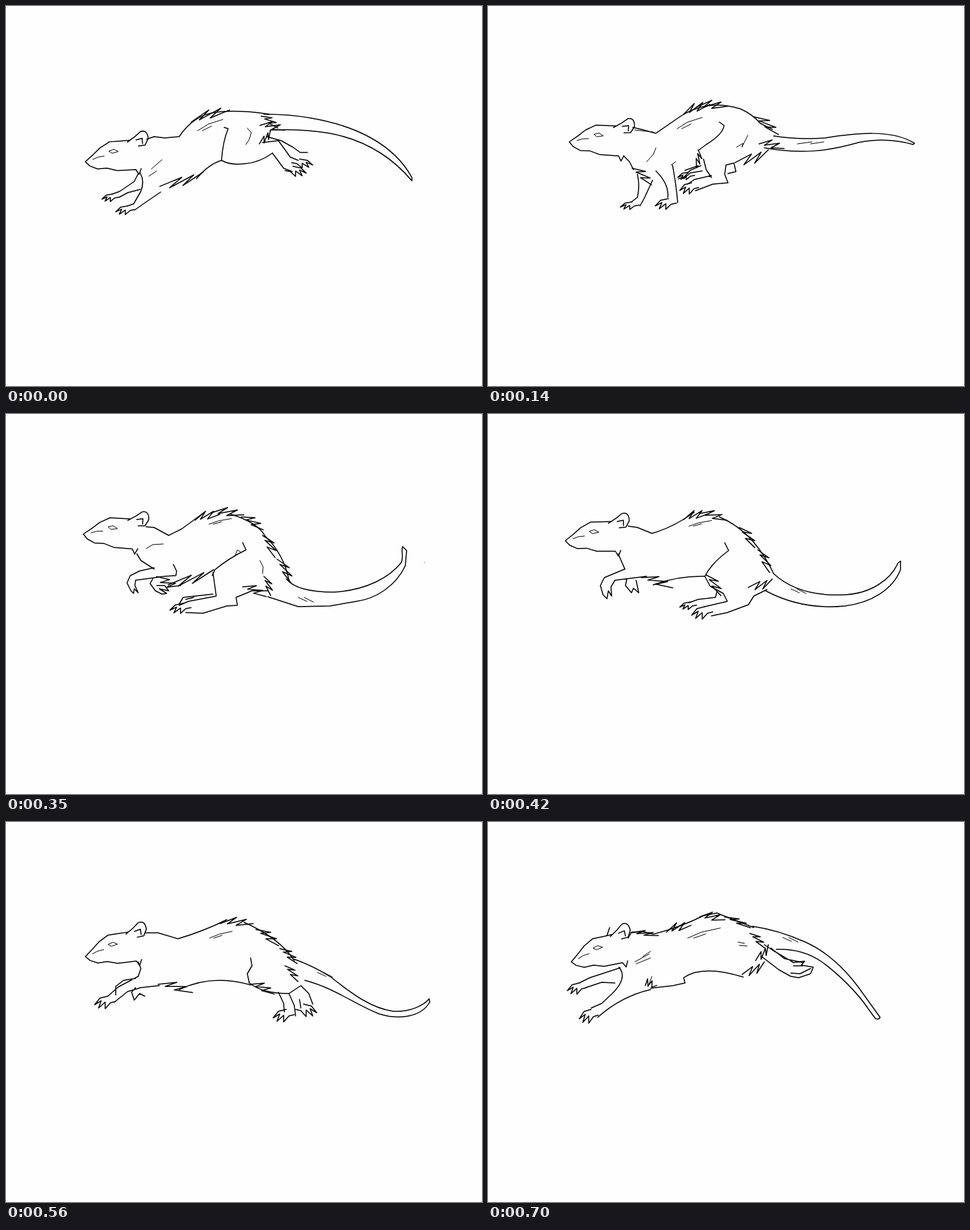
These frames come from a looping animation (720x576 px, 0.77 s). An HTML page without scripts:

```html
<!DOCTYPE html>
<html lang="en">
<head>
<meta charset="utf-8">
<title>Running rat</title>
<style>
html, body { margin: 0; width: 100%; height: 100%; overflow: hidden; background: #fefefe; }
.stage { width: 720px; height: 576px; overflow: hidden; }
/* Eleven poses stacked in a strip; the 1 ms lead avoids late steps. */
.strip { animation: run 770ms steps(11) -1ms infinite; }
@keyframes run { to { transform: translateY(-1100%); } }
.strip { height: 576px; }
svg { display: block; width: 720px; height: 576px; }
svg.parts { position: absolute; width: 0; height: 0; }
path { fill: none; stroke: #000; stroke-width: 1.5; stroke-linecap: round; stroke-linejoin: round; vector-effect: non-scaling-stroke; }
.fine { stroke-width: 1; }
</style>
</head>
<body>
<svg class="parts"><defs>
  <g id="head">
    <path d="M65-36L51-34 35-32 21-22 11-11 0 0 7 6 19 10 33 8 49 11 77 8l5 7 3-9"/>
    <path d="M62-33l11-9 8-8q10-4 12 10l-4 10-10 2M75-37l9-3 1 8"/>
    <path class="fine" d="M35-18l7-3 7 3-9 3zM11-4l8-4 9-2"/>
  </g>
  <path id="tuft" d="M0 0l20-6-12 8 23-3-13 7 20 1"/>
  <path id="paw" d="M0 0l-12 3-8 10 10-6-4 11 10-9 0 10 8-9 8-2"/>
  <path id="hatch" class="fine" d="M0 0l16-10 22-7M7 0l14-7"/>
  <path id="ticks" class="fine" d="M0 0l13 6M9 0l14 7"/>
</defs></svg>

<div class="stage"><div class="strip">

<!-- stretched, falling -->
<svg>
<use href="#head" transform="translate(120 236) rotate(3)"/>
<path d="M213 202L224 198 240 200 262 198Q284 165 318 161 352 157 398 164M403 223Q384 237 362 239 340 242 326 234 328 205 336 186L330 184M326 234Q306 240 288 262"/>
<path d="M388 207L412 204 430 229 442 234M403 223L420 246 433 251M394 198L416 204 434 214 445 222 456 222"/>
<path d="M234 282L212 297 195 309M203 253Q210 266 204 281L193 300 184 303M200 254L194 266 172 281 161 285M203 278L184 283 171 290"/>
<path d="M390 164Q430 164 462 170C525 181 585 207 614 260V265C588 234 548 204 490 193Q445 186 400 188"/>
<use href="#paw" transform="translate(184 303) scale(.9 .7)"/>
<use href="#paw" transform="translate(161 285) scale(.8 .6)"/>
<use href="#paw" transform="translate(444 232) scale(-1 .7)"/>
<use href="#paw" transform="translate(434 243) scale(-1 .8)"/>
<use href="#tuft" transform="translate(280 176) rotate(-24) scale(1.6 1)"/>
<use href="#tuft" transform="translate(386 167) rotate(25) scale(.8)"/>
<use href="#tuft" transform="translate(384 181)"/>
<use href="#tuft" transform="translate(400 188) rotate(118) scale(.7)"/>
<use href="#tuft" transform="translate(298 252) rotate(156) scale(1.8 1)"/>
<use href="#hatch" x="290" y="189"/>
<path class="fine" d="M216 258L228 250M220 247L236 233M365 185l6 7-3 10-5 8"/>
</svg>

<!-- front paws reaching ground -->
<svg>
<use href="#head" transform="translate(121 221) rotate(6)"/>
<path d="M217 193L234 193 256 196Q286 164 318 156 364 148 412 177M322 234Q322 212 338 200L344 187 338 180M322 234Q300 248 254 268M204 237L216 258"/>
<path d="M396 212L402 222 394 238 401 252 370 268 354 273M372 232L378 246 360 262 346 265M366 234L358 248 330 263"/>
<path d="M254 267Q246 292 232 310M232 268L230 284 222 302M216 258Q218 280 194 300M229 276Q218 298 205 307"/>
<path d="M412 177C478 178 570 190 638 234V238C570 207 490 207 408 202"/>
<use href="#paw" transform="translate(221 302)"/>
<use href="#paw" transform="translate(194 299) scale(.9)"/>
<use href="#paw" transform="translate(346 265)"/>
<use href="#tuft" transform="translate(288 172) rotate(-22) scale(1.6 1)"/>
<use href="#tuft" transform="translate(394 164) rotate(26)"/>
<use href="#tuft" transform="translate(404 188) scale(.8)"/>
<use href="#tuft" transform="translate(412 202) rotate(140) scale(.9)"/>
<use href="#tuft" transform="translate(256 266) rotate(170)"/>
<use href="#hatch" x="288" y="188"/>
</svg>

<!-- front paws planted -->
<svg>
<use href="#head" transform="translate(123 206) rotate(10)"/>
<path d="M219 184L232 187 254 193 290 168Q332 140 382 156 400 164 412 178L430 187M350 176L357 181Q356 194 330 210L318 219M206 228L214 236 220 248M288 262L297 259 306 249 322 242"/>
<path d="M326 232L330 248 338 260M372 238L360 241 358 255 363 268 340 270 314 280M372 238L375 251 363 254M338 257L312 263 302 270M324 250L306 253 296 262M318 242L298 249"/>
<path d="M254 250Q274 270 272 290M279 241Q284 266 287 298M226 255Q230 272 226 290L217 297M249 264L237 290 230 303"/>
<path d="M432 197Q470 203 510 200C555 193 610 186 645 208L643 210C615 202 590 201 560 207 515 220 475 225 418 215"/>
<use href="#paw" transform="translate(273 292) scale(1 .85)"/>
<use href="#paw" transform="translate(218 297) scale(.9 .6)"/>
<use href="#paw" transform="translate(308 268) scale(.9)"/>
<use href="#paw" transform="translate(303 252) scale(.8 .6)"/>
<use href="#tuft" transform="translate(296 164) rotate(-30) scale(1.1 1)"/>
<use href="#tuft" transform="translate(316 153) rotate(-10) scale(1.2 1)"/>
<use href="#tuft" transform="translate(402 168) rotate(27) scale(1.2 1)"/>
<use href="#tuft" transform="translate(410 209)"/>
<use href="#tuft" transform="translate(424 218) rotate(150) scale(1.4 1.2)"/>
<use href="#tuft" transform="translate(318 218) rotate(85) scale(.7)"/>
<use href="#tuft" transform="translate(218 246) rotate(30)"/>
<use href="#hatch" x="286" y="186"/>
<path class="fine" d="M222 188L250 191M277 241l7-5M240 236l10-11 4-10M376 214l10-6-2 6 9-18M468 209l22-3M488 209l20-3"/>
</svg>

<!-- gathered -->
<svg>
<use href="#head" transform="translate(121 180) rotate(20)"/>
<path d="M222 176L238 182 252 186Q280 184 300 152M352 156Q390 170 420 212M362 192L365 199 361 210M345 207Q314 208 298 233M196 214L206 228 230 248M215 210L208 232"/>
<path d="M332 262L326 275 290 288 274 290M306 236L298 264 284 270 262 275"/>
<path d="M258 234L228 249 226 262 232 276 246 278 238 268 244 256 262 250 290 245M252 254L256 270M266 261L270 272M270 260H306M268 289L276 301H282L276 289"/>
<path d="M436 237Q470 243 500 239C545 229 580 212 610 206L630 206V208L606 211C574 224 542 246 510 256 480 266 440 264 410 253"/>
<use href="#paw" transform="translate(262 275)"/>
<use href="#tuft" transform="translate(286 164) rotate(-28) scale(.9)"/>
<use href="#tuft" transform="translate(304 156) rotate(-8) scale(1.7 1)"/>
<use href="#tuft" transform="translate(222 176) rotate(12) scale(.8)"/>
<use href="#tuft" transform="translate(414 206) rotate(44)"/>
<use href="#tuft" transform="translate(414 224) rotate(20) scale(.8)"/>
<use href="#tuft" transform="translate(414 248) rotate(160) scale(2.1 1.1)"/>
<use href="#tuft" transform="translate(304 234) rotate(150)"/>
<use href="#hatch" x="292" y="185"/>
<path class="fine" d="M266 220l6 18M228 201l14-7M230 204l10-4M346 210l6-4M351 210l6-5M362 238l18-3 10-15M455 253l11 2M472 251l12 1M488 249h10M580 269h.1"/>
</svg>

<!-- hind feet land under the chest -->
<svg>
<use href="#head" transform="translate(118 181) rotate(15)"/>
<path d="M218 174L234 180 250 185Q276 178 302 150M356 156Q398 180 428 244M361 194L364 203 358 211Q324 218 307 238M197 213L204 226 230 244"/>
<path d="M342 267L336 278 338 286 300 297 270 299M310 238L310 270 268 281M306 267L270 273 262 281"/>
<path d="M230 240L203 251 200 262 207 276 212 267 218 276 212 259 220 253 268 247M232 254L228 264 238 277 248 278 241 270 254 274 246 262"/>
<path d="M428 244Q450 257 490 255C540 252 580 229 604 208L615 202 619 205C594 238 558 265 510 275 470 283 432 278 402 266"/>
<use href="#paw" transform="translate(264 284)"/>
<use href="#tuft" transform="translate(288 162) rotate(-28)"/>
<use href="#tuft" transform="translate(308 153) rotate(-8) scale(1.4 1)"/>
<use href="#tuft" transform="translate(396 182) rotate(45)"/>
<use href="#tuft" transform="translate(412 214) rotate(48)"/>
<use href="#tuft" transform="translate(414 252) rotate(162) scale(1.9 1)"/>
<use href="#tuft" transform="translate(306 238) rotate(158) scale(1.6 1)"/>
<use href="#hatch" x="300" y="177"/>
<use href="#ticks" x="448" y="267"/>
</svg>

<!-- crouched on hind feet -->
<svg>
<use href="#head" transform="translate(117 182) rotate(11)"/>
<path d="M212 171L224 172 246 184 266 174 300 149M340 152Q380 164 392 185 420 212 428 252M358 195L363 206Q338 218 316 236L312 245M198 212L204 222 224 235"/>
<path d="M396 268L372 268 348 278 350 290 334 291 298 302 272 301M313 240L318 276 276 284 262 290M313 273L268 278 262 288M272 281L284 278"/>
<path d="M224 233L202 238 188 245 183 256 189 268 193 272 194 265 200 271 195 260 196 252 240 246 257 245 258 238 253 228M222 250L218 257 226 268 236 273 243 272 232 265 246 268 240 260 228 260"/>
<path d="M424 250Q440 270 496 270C545 267 580 248 598 225 602 215 597 207 600 201L606 207 604 230C590 260 560 280 530 284L490 291 442 292 396 277"/>
<use href="#paw" transform="translate(268 287) scale(1 .8)"/>
<use href="#tuft" transform="translate(286 161) rotate(-24)"/>
<use href="#tuft" transform="translate(310 150) rotate(-5) scale(1.3 1)"/>
<use href="#tuft" transform="translate(356 156) rotate(20)"/>
<use href="#tuft" transform="translate(388 184) rotate(50)"/>
<use href="#tuft" transform="translate(410 220) rotate(50) scale(1.1 1)"/>
<use href="#tuft" transform="translate(390 246) rotate(60) scale(.8)"/>
<use href="#tuft" transform="translate(358 262) rotate(12)"/>
<use href="#tuft" transform="translate(314 236) rotate(156) scale(1.9 1)"/>
<use href="#tuft" transform="translate(264 260) rotate(190)"/>
<use href="#hatch" transform="translate(307 167) scale(.9 .5)"/>
<use href="#ticks" x="442" y="278"/>
<path class="fine" d="M212 204L222 198 238 197M346 216l4-10 6 4M384 222l5 10-1 10M633 225h.1"/>
</svg>

<!-- pushing off -->
<svg>
<use href="#head" transform="translate(117 192) rotate(6)"/>
<path d="M212 170L226 172 248 181Q280 172 312 149M350 156Q402 178 432 242M358 195L364 207Q338 226 328 246M197 212L207 235M250 259Q288 245 328 246"/>
<path d="M422 266L402 276 394 289 362 301 338 306M328 246L336 261 356 272 362 284 328 292M346 270L344 278 318 281 304 286"/>
<path d="M207 235L176 248 170 260 174 274 180 280 182 268 187 276 186 262 192 252 240 246M210 250L208 260 217 271 220 264 228 271 224 252"/>
<path d="M432 242C460 268 500 276 540 274 580 272 610 250 620 226L624 223V236C612 266 580 286 540 291 490 296 450 284 420 268"/>
<use href="#paw" transform="translate(328 292)"/>
<use href="#paw" transform="translate(306 285) scale(.8 .6)"/>
<use href="#tuft" transform="translate(296 160) rotate(-24)"/>
<use href="#tuft" transform="translate(320 151) rotate(4) scale(1.1 1)"/>
<use href="#tuft" transform="translate(380 172) rotate(42)"/>
<use href="#tuft" transform="translate(408 206) rotate(52)"/>
<use href="#tuft" transform="translate(430 250) rotate(150)"/>
<use href="#tuft" transform="translate(330 244) rotate(44)"/>
<use href="#tuft" transform="translate(232 248) rotate(10) scale(1.3 1)"/>
<use href="#hatch" transform="translate(304 170) scale(.9 .5)"/>
<use href="#ticks" x="458" y="265"/>
</svg>

<!-- rising, front legs reaching -->
<svg>
<use href="#head" transform="translate(119 202)"/>
<path d="M212 168L228 169 252 178Q286 170 320 152M352 160Q408 180 434 228M359 195L365 206 341 246M196 212L194 222 198 234M228 246L232 239 250 230M264 257Q304 242 340 250"/>
<path d="M341 247L352 262Q374 274 413 273M446 264L438 280 410 302 398 305M408 276L404 289 388 291 372 289M374 270L376 279 350 282M384 274L378 285 362 291"/>
<path d="M198 234L172 248 160 258 158 272 166 287 167 271 172 281 175 267 186 251 230 247M202 249L198 258 206 269 209 262 217 271 212 249"/>
<path d="M436 230Q466 236 492 248C520 268 545 280 580 278 610 278 630 268 636 254L641 251V261C630 282 600 293 565 293 530 292 500 278 470 269L438 260"/>
<use href="#paw" transform="translate(376 288)"/>
<use href="#paw" transform="translate(398 294)"/>
<use href="#paw" transform="translate(350 281) scale(.9 .7)"/>
<use href="#tuft" transform="translate(314 156) rotate(-12) scale(1.3 1)"/>
<use href="#tuft" transform="translate(378 172) rotate(22)"/>
<use href="#tuft" transform="translate(406 196) rotate(40) scale(1.1 1)"/>
<use href="#tuft" transform="translate(426 228) rotate(70) scale(.8)"/>
<use href="#tuft" transform="translate(418 252) rotate(12) scale(.8)"/>
<use href="#tuft" transform="translate(341 246) rotate(36)"/>
<use href="#tuft" transform="translate(228 246) rotate(6) scale(1.4 1)"/>
<use href="#tuft" transform="translate(212 169) rotate(8) scale(.9)"/>
<use href="#hatch" transform="translate(302 171) scale(.9 .4)"/>
<use href="#ticks" x="478" y="250"/>
<path class="fine" d="M206 190L200 206M198 218L218 203 230 200 234 188M250 224l8 4M404 212l7 14-3 14-14 5"/>
</svg>

<!-- leaving the ground -->
<svg>
<use href="#head" transform="translate(120 204) rotate(-1)"/>
<path d="M211 168L230 168 260 177Q298 166 334 148M360 152Q414 176 436 210M370 206L372 218 365 230 368 244M200 212L204 222 200 234M262 254Q312 230 370 247"/>
<path d="M368 244Q388 260 428 260L446 248 458 260 464 276M412 258L420 275 421 288M428 260L436 278 438 294M444 269L446 282"/>
<path d="M200 234L170 250 154 264M232 248L204 251 184 257 164 273M196 237L178 240 166 249 166 262M196 251L190 258 194 270 202 260 210 264"/>
<path d="M436 208Q462 217 490 234C524 261 552 282 586 287 612 288 632 278 640 268L641 273C628 296 594 300 565 291 530 278 498 252 452 240"/>
<use href="#paw" transform="translate(154 264)"/>
<use href="#paw" transform="translate(450 276) scale(-1 1)"/>
<use href="#paw" transform="translate(424 284)"/>
<use href="#tuft" transform="translate(324 154) rotate(-8) scale(1.3 1)"/>
<use href="#tuft" transform="translate(378 163) rotate(26) scale(1.1 1)"/>
<use href="#tuft" transform="translate(414 192) rotate(30) scale(.9)"/>
<use href="#tuft" transform="translate(422 218) rotate(40) scale(.8)"/>
<use href="#tuft" transform="translate(370 246) rotate(12)"/>
<use href="#tuft" transform="translate(230 246) rotate(6) scale(1.4 1)"/>
<use href="#hatch" transform="translate(308 176) scale(.9 .6)"/>
<use href="#ticks" x="471" y="228"/>
</svg>

<!-- long leap -->
<svg>
<use href="#head" transform="translate(121 206) rotate(-2)"/>
<path d="M210 168L230 168 270 174Q310 164 352 145M378 150L430 176M284 250Q312 232 344 231L406 248M202 214L210 220"/>
<path d="M438 214L460 208 470 220 490 236 514 251 498 248M432 247L446 236 458 230 472 244 494 256 524 266 500 264 516 274 488 270 478 255 464 239"/>
<path d="M446 234L454 250 456 266 480 273 470 264 462 248V238M236 251Q202 252 170 270L160 284M148 271L172 262Q196 244 210 220M205 226L168 237 157 245M198 238L184 246 167 250"/>
<path d="M430 176Q462 184 490 204C520 228 550 265 576 280 595 292 615 292 636 281L632 290C612 302 590 301 570 288 545 268 510 245 458 208"/>
<use href="#paw" transform="translate(150 273) scale(.8 1)"/>
<use href="#paw" transform="translate(158 244) scale(.7 .8)"/>
<use href="#tuft" transform="translate(330 152) rotate(-10) scale(1.3 1)"/>
<use href="#tuft" transform="translate(364 149) rotate(20) scale(1.7 1)"/>
<use href="#tuft" transform="translate(412 182) rotate(34)"/>
<use href="#tuft" transform="translate(414 194) rotate(22) scale(.9)"/>
<use href="#tuft" transform="translate(446 208) rotate(170) scale(.8)"/>
<use href="#tuft" transform="translate(382 240) rotate(14) scale(1.4 1)"/>
<use href="#tuft" transform="translate(236 251) scale(1.4 .6)"/>
<use href="#tuft" transform="translate(218 168) rotate(4)"/>
<use href="#ticks" x="465" y="192"/>
<use href="#ticks" x="474" y="203"/>
<path class="fine" d="M246 192Q244 212 216 214M236 249l24-13M314 180l14-9M320 178l14-9M336 173l18-5M398 195l14 3M400 202l14 6M402 208l14 4"/>
</svg>

<!-- top of the leap -->
<svg>
<use href="#head" transform="translate(126 212) rotate(-5)"/>
<path d="M212 176L217 167 234 166 250 170Q290 160 326 142L346 138 402 160M246 252L280 248 298 244 296 236Q324 216 386 235M180 172l4-12"/>
<path d="M418 186L430 194 462 213 479 211 474 217 492 220 488 230 470 236 458 234 440 224 414 204M428 191L448 207 476 213M462 218h14M458 229l14 1 16-8"/>
<path d="M246 254Q202 264 166 296M156 282L172 275 188 260Q212 236 198 220M200 221L154 236 138 244M192 244L172 243 148 251"/>
<path d="M400 158Q440 164 480 182C520 200 545 230 560 250L593 296Q592 300 586 298L575 283C560 260 530 230 505 212 485 198 460 192 436 193"/>
<use href="#paw" transform="translate(156 284) scale(.9 1.1)"/>
<use href="#paw" transform="translate(138 244) scale(.9)"/>
<use href="#tuft" transform="translate(216 168) scale(1.1 .6)"/>
<use href="#tuft" transform="translate(270 167) rotate(-26)"/>
<use href="#tuft" transform="translate(320 144) rotate(-4)"/>
<use href="#tuft" transform="translate(358 144) rotate(17) scale(1.1 .6)"/>
<use href="#tuft" transform="translate(396 169) rotate(34) scale(.8)"/>
<use href="#tuft" transform="translate(424 186) rotate(118) scale(.8)"/>
<use href="#tuft" transform="translate(418 212) rotate(140)"/>
<use href="#tuft" transform="translate(238 248) rotate(-30) scale(.4 1.2)"/>
<use href="#hatch" transform="translate(302 176) scale(1.3 .9)"/>
<use href="#ticks" x="446" y="175"/>
<path class="fine" d="M222 212L244 200M224 215L246 206M234 204L246 196M242 250l6-16M378 182l10 2M380 187l12 1"/>
</svg>
</div></div>
</body>
</html>
```
